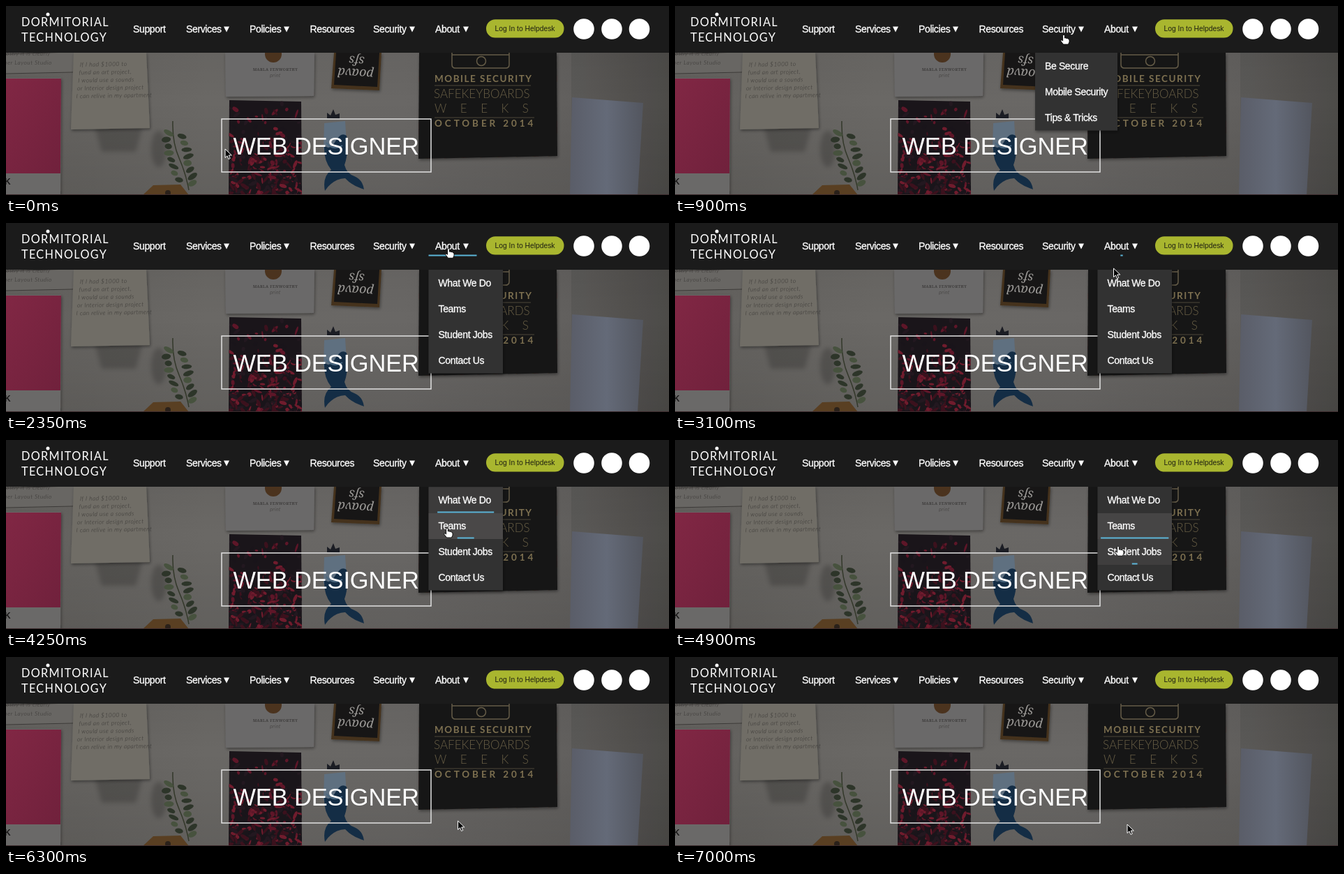
An HTML page for the animation above (7.05 s loop, 950 px wide and 271 px high).

```html
<!DOCTYPE html>
<html lang="en">
<head>
<meta charset="utf-8">
<title>Navigation menu</title>
<style>
  html, body { margin: 0; height: 100%; overflow: hidden; background: #1b1b1b; }
  svg { display: block; width: 100%; height: 100%; }
  text { white-space: pre; }
  .nav { font: 14px "Liberation Sans", Arial, sans-serif; letter-spacing: -.37px; fill: #fff; }
  .nav text, text.nav { stroke: #fff; stroke-width: .3px; }
  .hand { font: italic 300 8.5px Lato, sans-serif; fill: #33312f; letter-spacing: .45px; }
  .gold { font: 700 13.5px Lato, sans-serif; fill: #7d7050; }
  .thin { font: 300 17px Lato, sans-serif; fill: #685e45; }
  .brand { font: 400 16.3px Lato, sans-serif; letter-spacing: 1.3px; fill: #fff; }
</style>
</head>
<body>
<svg viewBox="0 0 950 271">
  <defs>
    <linearGradient id="wall">
      <stop offset="0" stop-color="#62605d"/><stop offset=".3" stop-color="#6a6865"/>
      <stop offset=".6" stop-color="#696765"/><stop offset=".87" stop-color="#615f5d"/><stop offset="1" stop-color="#53514e"/>
    </linearGradient>
    <linearGradient id="shade" x2="0" y2="1">
      <stop offset="0" stop-opacity=".08"/><stop offset=".5" stop-opacity="0"/><stop offset="1" stop-opacity=".08"/>
    </linearGradient>
    <linearGradient id="roll">
      <stop offset="0" stop-color="#5a5d68"/><stop offset=".5" stop-color="#646a78"/><stop offset="1" stop-color="#53565f"/>
    </linearGradient>
    <linearGradient id="pink" y2="1">
      <stop offset="0" stop-color="#812744"/><stop offset="1" stop-color="#70213c"/>
    </linearGradient>
    <filter id="soft" x="-20%" y="-20%" width="140%" height="140%">
      <feDropShadow dx="1" dy="2" stdDeviation="2" flood-opacity=".4"/>
    </filter>
    <filter id="blur"><feGaussianBlur stdDeviation="3"/></filter>
    <clipPath id="print"><path d="M320 135L423 137L424 271H319Z"/></clipPath>
  </defs>

  <rect width="950" height="271" fill="url(#wall)"/>
  <rect x="810" width="140" height="271" opacity=".08"/>
  <rect width="950" height="271" fill="url(#shade)"/>
  <g filter="url(#blur)" opacity=".18">
    <path d="M127 172H196L186 209H137Z"/>
    <ellipse cx="219" cy="205" rx="11" ry="26"/>
  </g>

  <!-- pinned notes and swatch -->
  <path d="M0 67H188V93L0 97Z" fill="#686663"/>
  <path d="M0 97L188 93M0 69L90 66" stroke="#3c3a38" fill="none"/>
  <text class="hand" x="-7" y="71">mostly it is clearly</text>
  <text class="hand" x="-12" y="84">Paper Layout Studio</text>
  <g filter="url(#soft)">
    <path d="M97 67L201 67L206 175L93 177Z" fill="#6f6d66"/>
    <path d="M0 103H79L78 271H0Z" fill="#6b6967"/>
    <path d="M314 67H442L441 129L315 130Z" fill="#6a6969"/>
    <path d="M470 67H538L535 121L466 118Z" fill="#44331f"/>
    <path d="M592 67H789L790 215L591 219Z" fill="#181615"/>
  </g>
  <g id="note" class="hand"></g>
  <path d="M0 104H79L78 240H0Z" fill="url(#pink)"/>
  <text x="-2" y="256" font-family="Liberation Sans, sans-serif" font-size="12" font-weight="700" fill="#1a1919">K</text>

  <!-- plant and tag -->
  <path d="M196 271L211 257L250 256L262 271Z" fill="#593f22"/>
  <circle cx="232" cy="268" r="4" fill="#2a211a"/>
  <path d="M239 165Q238 195 248 218T262 264" stroke="#33382a" stroke-width="1.5" fill="none"/>
  <g id="leaves"></g>

  <!-- cards -->
  <circle cx="383" cy="69" r="12" fill="#4b331e"/>
  <text x="386" y="93" text-anchor="middle" font-family="Noto Serif, serif" font-size="5.5" letter-spacing=".5" fill="#2c2a29">MARLA FENWORTHY</text>
  <text class="hand" x="386" y="102" text-anchor="middle" style="font-size:7px">print</text>
  <path d="M473 67H535L532 116L470 113Z" fill="#171616"/>
  <g font-family="Noto Serif, serif" font-style="italic" font-size="18" fill="#9c9a97">
    <text transform="translate(514 73) rotate(184)">sfs</text>
    <text transform="translate(527 92) rotate(184)">poavd</text>
  </g>
  <g clip-path="url(#print)">
    <rect x="318" y="134" width="108" height="140" fill="#1a151a"/>
    <g id="petals"></g>
  </g>

  <!-- paper tail -->
  <path d="M456 168L486 165L488 198L455 206Z" fill="#5f7080"/>
  <path d="M456 200Q464 208 472 194T488 186Q491 212 485 228Q488 240 499 244Q511 249 513 263Q496 258 486 247Q468 248 457 265Q453 245 466 235Q455 222 456 200Z" fill="#142d45"/>
  <path d="M459 196Q468 208 482 200" stroke="#4b6880" stroke-width="2" fill="none"/>
  <path d="M460 161V153L465 157L469 148L472 156L478 154V162Z" fill="#1b1d24"/>

  <!-- poster -->
  <g fill="none" stroke="#655c48" stroke-width="1.5">
    <path d="M639 67V84Q639 89 644 89H716Q721 89 721 84V67M639 70H721"/>
    <circle cx="681" cy="79" r="6.5"/>
    <path d="M614 114H752M614 160H757" stroke-width="1" opacity=".7"/>
  </g>
  <text class="gold" x="614" y="108.5" letter-spacing="1.5">MOBILE SECURITY</text>
  <text class="thin" x="613" y="132">SAFEKEYBOARDS</text>
  <text class="thin" x="614" y="153" letter-spacing="19.5">WEEKS</text>
  <text class="gold" x="614" y="173" letter-spacing="3.9">OCTOBER 2014</text>

  <path d="M811 131L913 139L905 271H808Z" fill="url(#roll)"/>
  <rect y="270" width="950" height="1" fill="#3b2a2c"/>

  <rect x="309" y="162" width="300" height="76" fill="none" stroke="#e2e2e2" stroke-width="1.5"/>
  <text x="325.5" y="212.5" font-family="Liberation Sans, Arial, sans-serif" font-size="34.4" letter-spacing="-.1" fill="#fff">WEB DESIGNER</text>

  <!-- header -->
  <rect width="950" height="67" fill="#1b1b1b"/>
  <circle cx="60" cy="12" r="2.5" fill="#fff"/>
  <text class="brand" x="22" y="29">DORMITORIAL</text>
  <text class="brand" x="22" y="51">TECHNOLOGY</text>
  <g id="links" class="nav"></g>
  <rect x="688" y="19.2" width="111.5" height="26.3" rx="13.1" fill="#a9b62f"/>
  <text x="743.5" y="35.5" text-anchor="middle" font-family="Liberation Sans, Arial, sans-serif" font-size="10.3" fill="#1e1f12">Log In to Helpdesk</text>
  <g fill="#fff"><circle cx="828" cy="33" r="14.8"/><circle cx="868" cy="33" r="14.8"/><circle cx="907.5" cy="33" r="14.8"/></g>

  <g id="menus"></g>
  <g id="lines" fill="#5cb5d8"></g>
  <g id="cursor">
    <path d="M0 0V12.5L3 9.8L5 14.5L7.2 13.5L5.2 9H9.3Z" fill="#000" stroke="#fff"/>
    <path d="M-1.4 1.2Q0 -1 1.4 1.2V5Q3 4.2 4 5.4Q5.6 4.8 6.4 6.2Q8 6 8 8V10.5L6.5 14H-.5L-4.4 9Q-4.6 7.2 -2.6 8L-1.4 9Z" fill="#fff" stroke="#000" stroke-width=".9"/>
  </g>
</svg>
<script>
const LOOP = 7050, ROW = 37;
const $ = id => document.getElementById(id);
const clamp = x => Math.min(1, Math.max(0, x));
const smooth = x => (x = clamp(x)) * x * (3 - 2 * x);

let seed = 7;
const rand = (a, b) => a + (b - a) * ((seed = seed * 16807 % 2147483647) / 2147483647);
const repeat = (n, make) => Array.from({ length: n }, (_, i) => make(i)).join('');
const leaf = (x, y, rx, ry, turn, color) =>
  `<ellipse cx="${x}" cy="${y}" rx="${rx}" ry="${ry}" transform="rotate(${turn} ${x} ${y})" fill="${color}"/>`;

$('note').innerHTML = ['If I had $1000 to', 'fund an art project,', 'I would use a sounds', 'or Interior design project', 'I can relive in my apartment']
  .map((s, i) => `<text x="${106 - i * 1.5}" y="${87 + i * 11.3}" transform="rotate(-1 106 90)">${s}</text>`).join('');

$('leaves').innerHTML = repeat(16, i => {
  const side = i % 2 ? 1 : -1, y = 182 + i * 4.8;
  const x = 239 + i * 1.3 + side * rand(6, 14);
  return leaf(x, y, rand(5, 8), rand(3, 4.5), side * rand(-50, 40), i % 3 ? '#2d3529' : '#47523e');
});

$('petals').innerHTML = repeat(260, () => leaf(
  rand(320, 424), 135 + 136 * Math.sqrt(rand(0, 1)), rand(2, 7), rand(1, 3), rand(0, 180),
  ['#5e1628', '#3c111d', '#701c2d', '#19141a', '#231820'][Math.floor(rand(0, 5))]
));

const links = [['Support', 182], ['Services', 258, 316], ['Policies', 349, 402], ['Resources', 435.5], ['Security', 526, 582], ['About', 615, 659]];
$('links').innerHTML = links.map(([name, x, arrow]) => `<text x="${x}" y="37.5">${name}</text>` +
  (arrow ? `<path d="M${arrow - 4} 29.5h8l-4 8z"/>` : '')).join('');

const menus = [
  { x: 516, w: 118, from: 890, to: 1870, items: ['Be Secure', 'Mobile Security', 'Tips &amp; Tricks'] },
  { x: 605.5, w: 106.5, from: 1900, to: 6150, items: ['What We Do', 'Teams', 'Student Jobs', 'Contact Us'] }
];
$('menus').innerHTML = menus.map(({ x, w, items }) => `<g>
  <rect x="${x}" y="67" width="${w}" height="${items.length * ROW + .5}" fill="#333" filter="url(#soft)"/>` +
  items.map((s, i) => `<rect x="${x}" y="${68 + i * ROW}" width="${w}" height="${ROW}" fill="#545252" opacity="0"/>
    <text class="nav" x="${x + 14}" y="${91 + i * ROW}">${s}</text>`).join('') + '</g>').join('');

// Hover spans: centre, full width, top, enter, leave, row in the second menu
const hovers = [
  [556.5, 81, 45.5, 890, 1850], [640, 69, 45.5, 1870, 2840],
  ...[3200, 4157, 4850, 5525].map((t, i, all) => [658.7, 105, 102.5 + i * ROW, t, all[i + 1] || 6150, i])
];
$('lines').innerHTML = repeat(hovers.length, () => '<rect height="2"/>');

const path = [
  [0, 314, 205], [150, 314, 205], [850, 556, 43], [900, 557, 41], [1400, 560, 38], [1850, 620, 33],
  [2250, 634, 36], [2700, 634, 38], [3100, 628.5, 65], [3400, 630, 86], [3900, 630, 90], [4250, 632, 126],
  [4700, 632, 130], [5000, 636, 160], [5350, 638, 165], [5550, 644.5, 210], [6000, 645, 208],
  [6400, 648, 240], [LOOP, 648, 240]
];

function cursorAt(t) {
  const i = path.findIndex(p => p[0] > t);
  const [t0, x0, y0] = path[i - 1], [t1, x1, y1] = path[i];
  const k = smooth((t - t0) / (t1 - t0));
  return [x0 + (x1 - x0) * k, y0 + (y1 - y0) * k];
}

function draw() {
  const t = Math.floor(performance.now() % LOOP / 50) * 50;
  const groups = $('menus').children;
  menus.forEach((m, i) => groups[i].style.display = t >= m.from && t < m.to ? '' : 'none');
  const rows = groups[1].querySelectorAll('rect[opacity]');
  hovers.forEach(([cx, full, y, from, to, row], i) => {
    const w = full * (smooth((t - from) / 300) - smooth((t - to) / 300));
    const line = $('lines').children[i];
    line.setAttribute('x', cx - w / 2);
    line.setAttribute('y', y);
    line.setAttribute('width', Math.max(0, w));
    if (row !== undefined) {
      rows[row].setAttribute('opacity', clamp((t - from) / 130) - clamp((t - to) / 130));
      line.style.display = t < menus[1].to ? '' : 'none';
    }
  });
  const [arrow, hand] = $('cursor').children;
  const pointing = t >= 890 && t < 2840 || t >= 3200 && t < 6150;
  arrow.style.display = pointing ? 'none' : '';
  hand.style.display = pointing ? '' : 'none';
  $('cursor').setAttribute('transform', `translate(${cursorAt(t)})`);
  requestAnimationFrame(draw);
}
draw();
</script>
</body>
</html>
```
